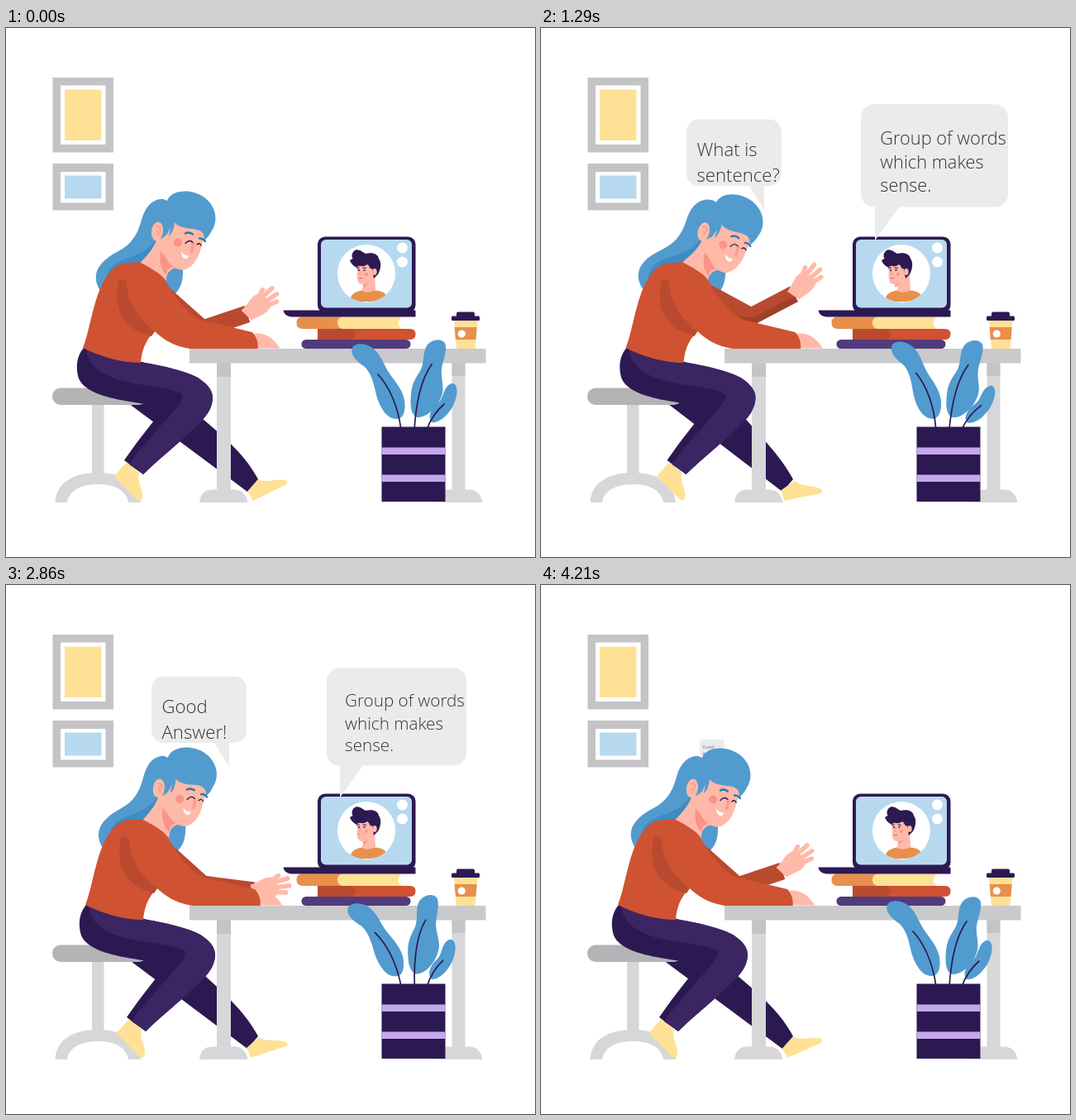
Recreate the animation shown at these times as an HTML page. Size 640 by 640 pixels, loop 4280 ms.

```html
<!DOCTYPE html>
<html lang="en">
<head>
<meta charset="utf-8">
<title>Video lesson</title>
<style>
html, body { margin: 0; width: 100%; height: 100%; overflow: hidden; background: #fff; }
svg { display: block; width: 100vw; height: 100vh; }
text { font: 300 22.2px "Open Sans", "Noto Sans", sans-serif; fill: #333; }
.small { font-size: 20.7px; }
.navy { fill: #2d1952; } .plum { fill: #3b2563; } .red { fill: #cf5232; } .rust { fill: #b94a2f; }
.blue { fill: #529bcf; } .deep { fill: #3d8cc4; } .sky { fill: #b7d9f0; } .skin { fill: #ffb9a8; }
.pink { fill: #fa938a; } .cream { fill: #ffe196; } .orange { fill: #e8904b; } .white { fill: #fff; }
.gray { fill: #c4c4c6; } .pale { fill: #d7d7d9; } .bubble { fill: #ebebeb; }
.line { fill: none; stroke: #2d1952; stroke-width: 1.7; stroke-linecap: round; }
</style>
</head>
<body>
<svg viewBox="0 0 640 640">
  <defs>
    <clipPath id="porthole"><circle cx="436" cy="297" r="35"/></clipPath>
  </defs>

  <!-- wall -->
  <path class="gray" d="M56.500 60H130V150.500H56.500ZM56.500 164H130V220.500H56.500Z"/>
  <path class="white" d="M66 69.500H120.500V141H66ZM66 174H120.500V211.500H66Z"/>
  <path class="cream" d="M71 74.500H115.500V136H71Z"/>
  <path class="sky" d="M71 178.500H115.500V206.500H71Z"/>

  <!-- far leg -->
  <path id="farLeg" class="navy"/>
  <path id="farFoot" class="cream" d="M292 561L305 546C315 551 328 545 338 547Q343 550 338 553C325 559 312 566 299 572Z"/>

  <!-- stool -->
  <path class="pale" d="M104 455H118.500V540H104Z"/>
  <path class="pale" d="M59.500 574C61 549 83 538 111 538C139 538 161 549 163 574H148C146 560 132 552 111 552C90 552 76 560 74 574Z"/>
  <rect x="56" y="435.500" width="115" height="20.500" rx="10" fill="#b4b4b6"/>

  <!-- table -->
  <path class="pale" d="M255 405H272V560H255ZM539.500 405H555.500V560H539.500Z"/>
  <path class="gray" d="M255 405H272V422H255ZM539.500 405H555.500V421H539.500Z"/>
  <path id="base" class="pale" d="M234 574C235 563 241 558.500 250 558.500H276C286 558.500 291 565 292.500 574Z"/>
  <use href="#base" x="284"/>
  <path fill="#cacacc" d="M222 388H580.500V405.500H222Z"/>

  <!-- books -->
  <path class="orange" d="M359 349.500H407V364H359Q351.500 364 351.500 356.700T359 349.500Z"/>
  <path class="cream" d="M409 349.500H479Q470 357 479 364H409Q401 364 401 356.700T409 349.500Z"/>
  <path class="red" d="M377 364H489Q495.500 364 495.500 370.500T489 377H377Z"/>
  <path class="rust" d="M377 364H419Q427 370 419 377H377Z"/>
  <rect x="357.500" y="377" width="132" height="11" rx="5.500" fill="#523b7c"/>

  <!-- laptop -->
  <rect class="navy" x="377" y="252.500" width="118.500" height="92" rx="9"/>
  <rect class="sky" x="381" y="256" width="110" height="82.500" rx="6"/>
  <path class="navy" d="M335.500 341.500H495.500V349.500H345Q336 348 335.500 341.500Z"/>
  <g class="white">
    <circle cx="436" cy="297" r="35"/>
    <circle cx="479.500" cy="266" r="6.500"/><circle cx="479.500" cy="283" r="6.500"/>
  </g>
  <g clip-path="url(#porthole)">
    <path class="orange" d="M417 328C417 320 428 317 438 317C450 317 458 319 459.500 323C456 330 447 331 435 331Q424 332 417 328Z"/>
    <path class="skin" d="M432 305L446 298L447 317Q438 322 430 318Q433 313 432 305Z"/>
    <g id="pupil">
      <path class="skin" d="M426 284C424 295 424 306 427 309Q433 312 439 308L446 301L447 285Z"/>
      <path class="pink" d="M431.500 311L439 308L433 314Z"/>
      <circle class="pink" cx="436" cy="298" r="2"/>
      <path class="navy" d="M416 281L419.500 279C417 274 420 270 423 268.500C428 267.500 431 271 435 273C443 271 450 273 451 279C455 284 453 293 450 298L445 303L443 291C440 293 440 287 437 286C431 291 428 285 424.500 290Q418 287 416 281Z"/>
      <ellipse class="skin" cx="446" cy="295" rx="2.700" ry="4"/>
      <circle class="navy" cx="427" cy="293" r="1.100"/><circle class="navy" cx="433.500" cy="293" r="1.100"/>
      <path class="line" style="stroke-width:1.100" d="M424.500 290.500L427.500 290M432 290L435.500 290.500"/>
      <path fill="none" stroke="#fa938a" d="M429 293L427.500 298H429.500"/>
      <path id="calm" fill="none" stroke="#c4625a" d="M427 303L431 302.500"/>
      <path id="smile" fill="#fff" stroke="#c4625a" stroke-width=".5" d="M426 301Q430 303 434 300.500Q431 306.500 426 301Z"/>
    </g>
  </g>

  <!-- cup -->
  <path class="cream" d="M542 353H570.500L567.500 388H545Z"/>
  <path class="orange" d="M542.500 362H569.700L568.500 377H544Z"/>
  <circle class="white" cx="551.300" cy="370" r="4.600"/>
  <rect class="navy" x="545" y="343.500" width="22" height="8" rx="2"/>
  <rect class="navy" x="539" y="348.500" width="34" height="5.500" rx="1.500"/>

  <!-- speech -->
  <g id="ask">
    <path class="bubble" d="M250 188L270 220V184Z"/>
    <rect class="bubble" x="176" y="110.500" width="115" height="80.500" rx="15"/>
    <text x="188.500" y="154.500" id="ask1"></text><text x="188.500" y="185.500" id="ask2"></text>
  </g>
  <g id="reply">
    <path class="bubble" d="M404 214V257L433 217Z"/>
    <rect class="bubble" x="388" y="100.500" width="169" height="118" rx="15"/>
    <text class="small" x="410" y="147">Group of words</text>
    <text class="small" x="410" y="174.500">which makes</text>
    <text class="small" x="410" y="201">sense.</text>
  </g>

  <!-- woman -->
  <g id="hair">
    <path class="blue" d="M190 207C176 207 168 218 164 232C159 251 151 262 136 270C115 281 106 293 109.500 308C112 317 117 322 121 322L160 300L204 322C212 315 215 305 214 286L205 230Z"/>
    <path class="deep" d="M184 250C176 268 160 274 140 281C126 287 119 297 121 316L165 292L190 262Z"/>
  </g>
  <g id="head">
    <path class="blue" d="M190 207C172 207 166 225 166 235L190 255Z"/>
    <path class="skin" d="M158 288C172 275 181 264 184 250L213 288C200 291 194 294 194 306Z"/>
    <path class="pink" d="M187 270C185 284 188 293 194 299C194 293 197 290 203 289Z"/>
    <path class="skin" d="M189 238C186 262 192 280 200 287C208 294 216 294 221 290C232 284 235 269 239 256L243 244L215 230Z"/>
    <path class="blue" d="M178 242C165 230 172 208 190 207L195 209C200 195 225 194 240 205C256 217 256 235 249 245C246 252 242 255 239 258C242 247 235 244 226 243C214 242 208 240 204 235C203 244 200 250 197 252L199 241C196 248 194 253 188 254L188 239Z"/>
    <ellipse class="skin" cx="183" cy="246" rx="7" ry="11.500" transform="rotate(8 183 246)"/>
    <path fill="none" stroke="#fa938a" stroke-width="1.300" d="M181 241Q187 238 187 246M182 246Q186 246 184 251"/>
    <circle class="pink" cx="208" cy="259.500" r="5"/>
    <path class="pink" d="M229 260L226 272H222Q225 267 224 261Z" opacity=".75"/>
    <path class="line" style="stroke:#3575ad;stroke-width:2.400" d="M217 248.500Q221 246 226 249.500M234 254.500Q238 254 241 258"/>
    <path class="line" style="stroke-width:1.400" d="M217 260.500Q222 255 226 259.500M231 262Q234 259 236 263"/>
    <path class="white" d="M212 270.500Q215 275 221 275.500Q220 280 216 279Q212 277 212 270.500Z"/>
  </g>
  <g fill="none" stroke-linejoin="round">
    <path id="arm" stroke="#b94a2f" stroke-width="21"/>
    <path id="armShade" stroke="#9e4028" stroke-width="8"/>
  </g>
  <g id="hand">
    <path class="skin" d="M-3-8C8-8 15-14 24-11Q34 2 27 11C18 16 8 10-1 9Z"/>
    <path fill="none" stroke="#ffb9a8" stroke-width="5.500" stroke-linecap="round" d="M20-6L33-11M23-4L43-5M25 2L43 4M23 7L37 11"/>
  </g>
  <g id="body">
    <path class="cream" d="M146 525L130.500 542L155 567Q164 577 165 566C166 558 158 550 161 538Z"/>
    <path class="navy" d="M95 386C85 396 84 412 88 424C95 441 125 448 150 452C170 456 181 455 193 457C178 477 160 498 143 523L166 540C186 520 214 499 236 476C245 467 250 457 250 447C250 438 243 430 232 423C215 414 190 409 168 405Z"/>
    <path class="plum" d="M97 387C98 413 125 424 150 429C175 434 205 436 213 443C217 450 203 463 190 478C173 498 158 514 149 528L166 540C186 520 214 499 236 476C245 467 250 457 250 447C250 438 243 430 232 423C215 414 190 409 168 405Z"/>
    <path class="skin" d="M298 370C314 367 324 376 331.500 387.500H300Z"/>
    <path class="red" d="M93 387C104 360 106 312 131 290C141 282 153 285 161 283C174 290 186 296 192 304C203 325 219 345 235 353L298 368Q306 377 304.500 388H222C200 384 188 375 180 367C168 378 164 392 163 405C140 405 115 398 93 387Z"/>
    <path class="rust" d="M136 306C130 338 140 364 176 373L180 367C160 352 146 330 146 308Q140 300 136 306Z"/>
  </g>

  <!-- plant -->
  <g id="leaf1">
    <path class="blue" d="M472 473C460 473 452 458 448 444C445 430 442 418 434 410C424 403 417 396 418.500 389C420 381 432 381 440 385C452 391 456 405 462 415C468 425 479 435 482 450C484 462 481 474 472 473Z"/>
    <path class="line" d="M478 486C474 455 462 432 450 419"/>
  </g>
  <g id="leaf2">
    <path class="blue" d="M497 471C489 467 489 455 490 443C491 430 496 423 501 415C507 405 503 392 510 383C516 376 528 375 531.500 382C534 392 528 403 527 413C526 424 530 432 528 442C524 457 510 472 497 471Z"/>
    <path class="line" d="M494 486C496 455 502 425 515 407"/>
  </g>
  <g id="leaf3">
    <path class="blue" d="M515 477C509 470 516 459 522 454C530 449 528 434 539 430C546 429 547 440 544 449C541 458 539 461 534 467C528 474 520 478 515 477Z"/>
    <path class="line" d="M509 486C514 472 522 462 530 455"/>
  </g>
  <path class="navy" d="M454.500 482.500H531.500V573H454.500Z"/>
  <path fill="#c4a8eb" d="M454.500 507.500H531.500V516H454.500ZM454.500 540.500H531.500V549H454.500Z"/>
</svg>
<script>
const LOOP = 4280, STEP = LOOP / 60;
const KEY_TIMES = [0, 570, 1290, 1860, 2860, 3430, 4210];
const KEYS = {
  lean: [0, 10.5, 9.5, 7.2, 3, 0.7, 0],
  tilt: [0, 7, 5.5, 2.5, -1.5, -0.5, 0],
  elbowX: [238, 260, 254, 250, 238, 238, 238],
  elbowY: [364, 344, 349, 356, 362, 361, 364],
  wristX: [292, 308, 306, 305, 300, 295, 292],
  wristY: [346, 303, 322, 343, 370, 360, 346],
  foot: [0, 17, 15, 13, 8, 6, 2],
  leaf1: [0, 1.2, 3.4, 3.2, -3.2, -2.8, 0],
  leaf2: [0, 1.1, 1.5, -2, -5.5, -3.5, 0],
  leaf3: [0, 2, 5, 3.5, -2.5, -1.5, 0],
  pupil: [0, 0, -4, -3.5, 0, 0, 0]
};
const el = {};
document.querySelectorAll('[id]').forEach(e => el[e.id] = e);
const set = (id, name, value) => el[id].setAttribute(name, value);
const spin = (id, angle, x, y, dx = 0) =>
  set(id, 'transform', `translate(${dx} 0) rotate(${angle} ${x} ${y})`);
const clamp = v => Math.max(0, Math.min(1, v));

// Periodic cubic curve through the keys, without overshoot.
function sample(values, t) {
  const n = values.length;
  const time = i => KEY_TIMES[(i + n) % n] + LOOP * Math.floor(i / n);
  const value = i => values[(i + n) % n];
  const slope = i => (value(i + 1) - value(i)) / (time(i + 1) - time(i));
  const tangent = i => {
    const a = slope(i - 1), b = slope(i);
    return a * b <= 0 ? 0 : 2 * a * b / (a + b);
  };
  let i = n - 1;
  while (KEY_TIMES[i] > t) i--;
  const h = time(i + 1) - time(i), u = (t - time(i)) / h, v = 1 - u;
  return v * v * (1 + 2 * u) * value(i) + u * u * (3 - 2 * u) * value(i + 1)
    + h * u * v * (v * tangent(i) - u * tangent(i + 1));
}

// Springs in from `enter`, springs back out until `leave`; both take 500 ms.
function popScale(t, enter, leave) {
  const u = 1 - clamp(Math.min(t - enter, leave - t) / 500);
  return 1 + u * u * (1.70158 - 2.70158 * u);
}
function pop(id, scale, x, y) {
  set(id, 'transform', `translate(${x} ${y}) scale(${scale}) translate(${-x} ${-y})`);
  set(id, 'visibility', scale > 0.02 ? 'visible' : 'hidden');
}

function draw(t) {
  const p = {};
  for (const name in KEYS) p[name] = sample(KEYS[name], t);
  const { lean, elbowX: ex, elbowY: ey, wristX: wx, wristY: wy } = p;

  set('body', 'transform', `translate(${lean} 0)`);
  spin('hair', p.tilt / 2, 180, 290, lean);
  spin('head', p.tilt, 180, 290, lean);
  set('farLeg', 'd', `M${148 + lean * 0.5} 454L292 561L305 546C292 522 276 505 ${238 + lean} 473L200 450Z`);
  spin('farFoot', p.foot, 298, 554);

  const angle = Math.atan2(wy - ey, wx - ex);
  const ox = -Math.sin(angle) * 6.5, oy = Math.cos(angle) * 6.5;
  set('arm', 'd', `M${184 + lean} 316L${ex} ${ey}L${wx} ${wy}`);
  set('armShade', 'd', `M${ex - 18} ${ey + 4}L${ex + ox} ${ey + oy}L${wx + ox} ${wy + oy}`);
  set('armShade', 'opacity', clamp(lean / 7));
  set('hand', 'transform', `translate(${wx} ${wy}) rotate(${angle * 180 / Math.PI - 21})`);

  spin('leaf1', p.leaf1, 478, 483);
  spin('leaf2', p.leaf2, 494, 483);
  spin('leaf3', p.leaf3, 510, 483);

  const happy = t > 1570 && t < 3750;
  set('pupil', 'transform', `translate(${p.pupil} 0)`);
  set('smile', 'visibility', happy ? 'visible' : 'hidden');
  set('calm', 'visibility', happy ? 'hidden' : 'visible');

  const [first, second] = t < 2600 ? ['What is', 'sentence?'] : ['Good', 'Answer!'];
  el.ask1.textContent = first;
  el.ask2.textContent = second;
  pop('ask', popScale(t, 378, 4238), 198, 213);
  pop('reply', popScale(t, 1069, 4210), 404, 257);
}

const start = performance.now();
function tick() {
  const t = (performance.now() - start) % LOOP;
  draw(Math.floor((t + 5) / STEP) % 60 * STEP);
  requestAnimationFrame(tick);
}
tick();
</script>
</body>
</html>
```
